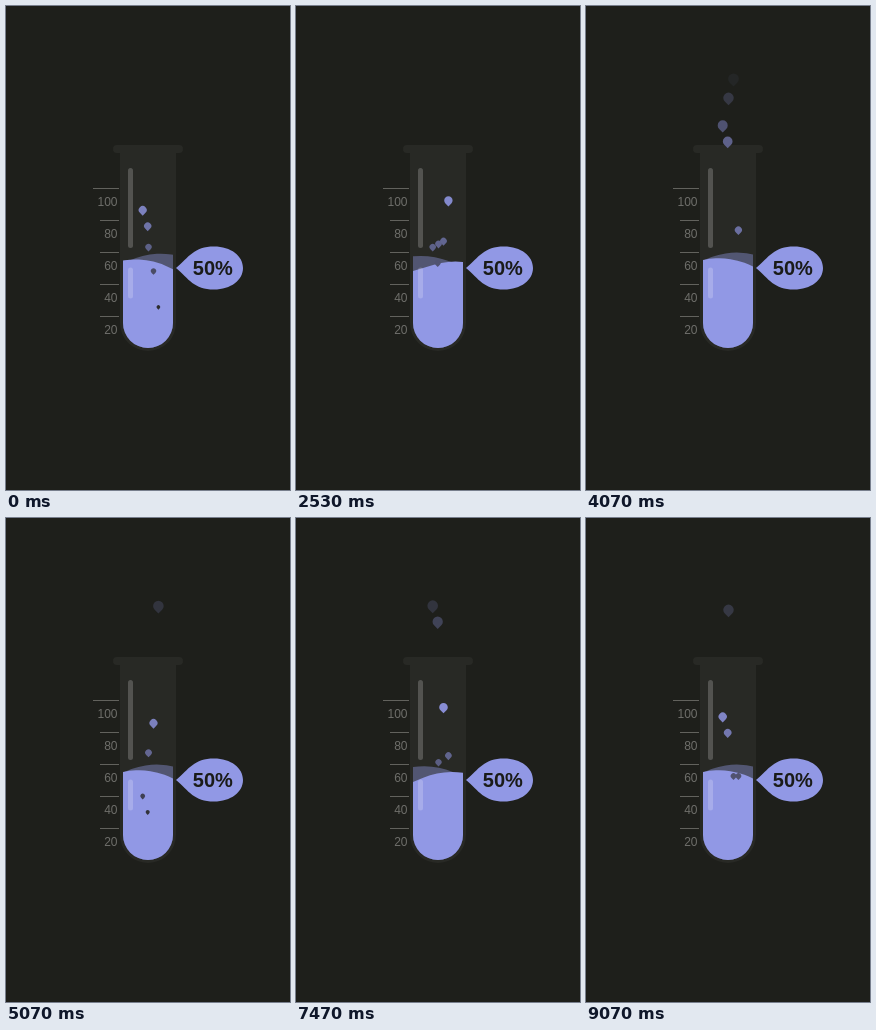
Write an HTML page that moves like this. It is 284 px wide and 484 px high and loops after 9.14 s.

```html
<!DOCTYPE html>
<html lang="en">
<head>
<meta charset="utf-8">
<title>Test tube</title>
<style>
  html, body { margin: 0; width: 100%; height: 100%; overflow: hidden; background: #1e1f1b; }
  svg { display: block; width: 284px; height: 484px; }
  text { font-family: "Liberation Sans", Arial, sans-serif; }
  .glass { fill: #282925; }
  .liquid { fill: #9198e5; }
  .shine { fill: #fff; opacity: .2; }
  .scale text { font-size: 12px; fill: #6e6e6a; text-anchor: end; }
  .scale path { stroke: #62625d; }
</style>
</head>
<body>
<svg viewBox="0 0 284 484">
  <clipPath id="inside"><path d="M117 147H167V317A25 25 0 0 1 117 317Z"/></clipPath>
  <g class="scale" id="scale"></g>
  <path class="glass" d="M114 146H170V317A28 28 0 0 1 114 317Z"/>
  <rect class="glass" x="107" y="139" width="70" height="8" rx="4"/>
  <g class="liquid" clip-path="url(#inside)">
    <rect id="backWave" x="-100" y="-100" width="200" height="200" rx="74" opacity=".4"/>
    <rect id="frontWave" x="-100" y="-100" width="200" height="200" rx="74"/>
  </g>
  <g id="bubbles"></g>
  <rect class="shine" x="122" y="162" width="5" height="80" rx="2.5"/>
  <rect class="shine" x="122" y="261.5" width="5" height="31" rx="2.5"/>
  <path class="liquid" d="M170 262C183 251 188 240.5 208 240.5C225 240.5 237 250 237 262S225 283.5 208 283.5C188 283.5 183 273 170 262Z"/>
  <text x="206.8" y="269" font-size="20" font-weight="bold" text-anchor="middle" fill="#1a1b18">50%</text>
</svg>
<script>
const LOOP = 9140, FPS = 15;
const BUBBLE_BOTTOM = 304, BUBBLE_TRAVEL = 238;
const DARK = [42, 42, 44], BRIGHT = [139, 145, 218], FADED = [30, 31, 27];

// x, seconds per rise, height at time zero
const bubbles = [
  [136.7, 3, 204],
  [141.7, 3, 220],
  [142.5, 2.5, 241],
  [147.5, 2.25, 265],
  [152.4, 1.75, 301]
].map(([x, period, y]) => ({ x, period, start: (BUBBLE_BOTTOM - y) / BUBBLE_TRAVEL }));

const byId = id => document.getElementById(id);
const mix = (a, b, k) => a + (b - a) * k;
const mixColor = (a, b, k) => `rgb(${a.map((v, i) => Math.round(mix(v, b[i], k)))})`;

function add(parent, tag, attributes, text = '') {
  const node = document.createElementNS('http://www.w3.org/2000/svg', tag);
  for (const name in attributes) node.setAttribute(name, attributes[name]);
  node.textContent = text;
  return parent.appendChild(node);
}

for (let i = 0; i < 5; i++) {
  const y = 182.5 + 32 * i;
  add(byId('scale'), 'path', { d: `M${i ? 94 : 87} ${y}H113` });
  add(byId('scale'), 'text', { x: 111.5, y: y + 17.5 }, 100 - 20 * i);
}

// Unit drop: a round head with a right-angled tip below
for (const bubble of bubbles)
  bubble.node = add(byId('bubbles'), 'path', { d: 'M-.707 .707A1 1 0 1 1 .707 .707L0 1.414Z' });

function draw(seconds) {
  const turn = 90 * (seconds - 0.22);
  byId('frontWave').setAttribute('transform', `translate(142 362) rotate(${45 + turn})`);
  byId('backWave').setAttribute('transform', `translate(142 356.3) rotate(${45 - turn})`);

  for (const { x, period, start, node } of bubbles) {
    const p = (start + seconds / period) % 1;
    const rising = p < 0.5;
    const half = rising ? p * 2 : p * 2 - 1;
    const radius = rising ? mix(1.8, 4.4, half) : mix(4.4, 5.5, half);
    const y = BUBBLE_BOTTOM - BUBBLE_TRAVEL * p;
    node.setAttribute('transform', `translate(${x} ${y}) scale(${radius})`);
    node.setAttribute('fill', rising ? mixColor(DARK, BRIGHT, half) : mixColor(BRIGHT, FADED, half));
  }
}

const began = performance.now();
function tick() {
  const time = (performance.now() - began) % LOOP;
  draw(Math.floor((time + 4) * FPS / 1000) / FPS);
  requestAnimationFrame(tick);
}
tick();
</script>
</body>
</html>
```
